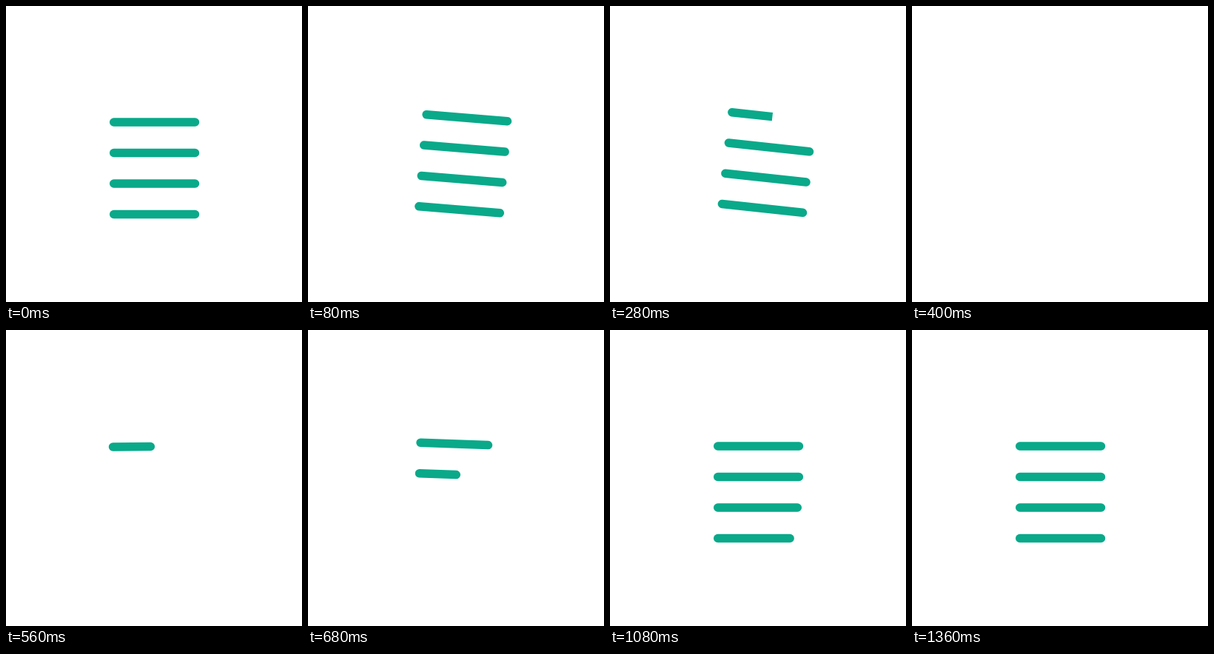
An HTML page for the animation above (1960 ms loop, 400 px wide and 400 px high).

```html
<!DOCTYPE html>
<html lang="en">
<head>
<meta charset="utf-8">
<title>Menu lines</title>
<style>
  html, body { margin: 0; width: 100%; height: 100%; overflow: hidden; background: #fff; }
  svg { display: block; width: 100%; height: 100%; }
</style>
</head>
<body>
<svg viewBox="0 0 400 400"><g id="lines" fill="#09a98a"></g></svg>
<script>
  const LOOP = 1960, STEP = 40;
  const LEFT = 145.7, LENGTH = 109.8, TOP = 157, GAP = 41.5, R = 5.75;
  const PIVOT = '278 327';

  // Tilt in degrees: wind up, swing out, then a smaller swing on return.
  const TILT = [
    [0, 0], [40, -1.3], [80, 4.7], [120, 6.6], [160, 7], [280, 6.2], [400, 5.6],
    [480, 0], [560, -0.4], [600, -0.6], [640, 0.9], [680, 2.1], [720, 1.8],
    [800, 0.9], [880, 0.25], [960, 0], [LOOP, 0]
  ];

  const group = document.getElementById('lines');
  const bars = Array.from({ length: 4 }, () =>
    group.appendChild(document.createElementNS('http://www.w3.org/2000/svg', 'path')));

  const clamp = v => Math.min(1, Math.max(0, v));
  const outQuint = u => 1 - (1 - u) ** 5;

  function tiltAt(t) {
    const i = TILT.findIndex(k => k[0] > t);
    const [t0, a] = TILT[i - 1], [t1, b] = TILT[i];
    return a + (b - a) * (t - t0) / (t1 - t0);
  }

  function barPath(y, part, round) {
    if (part <= 0) return '';
    const end = LEFT + LENGTH * part;
    const tip = round ? `A${R} ${R} 0 0 0 ${end} ${y - R}` : `V${y - R}`;
    return `M${LEFT} ${y - R}A${R} ${R} 0 0 0 ${LEFT} ${y + R}H${end}${tip}Z`;
  }

  function draw(t) {
    const leaving = t < 440;
    bars.forEach((bar, i) => {
      const part = leaving
        ? 1 - clamp((t - 250 - 30 * i) / 60)
        : outQuint(clamp((t - 484 - 122 * i) / 650));
      bar.setAttribute('d', barPath(TOP + GAP * i, part, !leaving || part === 1));
    });
    group.setAttribute('transform', `rotate(${tiltAt(t)} ${PIVOT})`);
  }

  const start = performance.now();
  function tick() {
    const t = (performance.now() - start) % LOOP;
    draw(Math.floor(t / STEP) * STEP);
    requestAnimationFrame(tick);
  }
  draw(0);
  requestAnimationFrame(tick);
</script>
</body>
</html>
```
